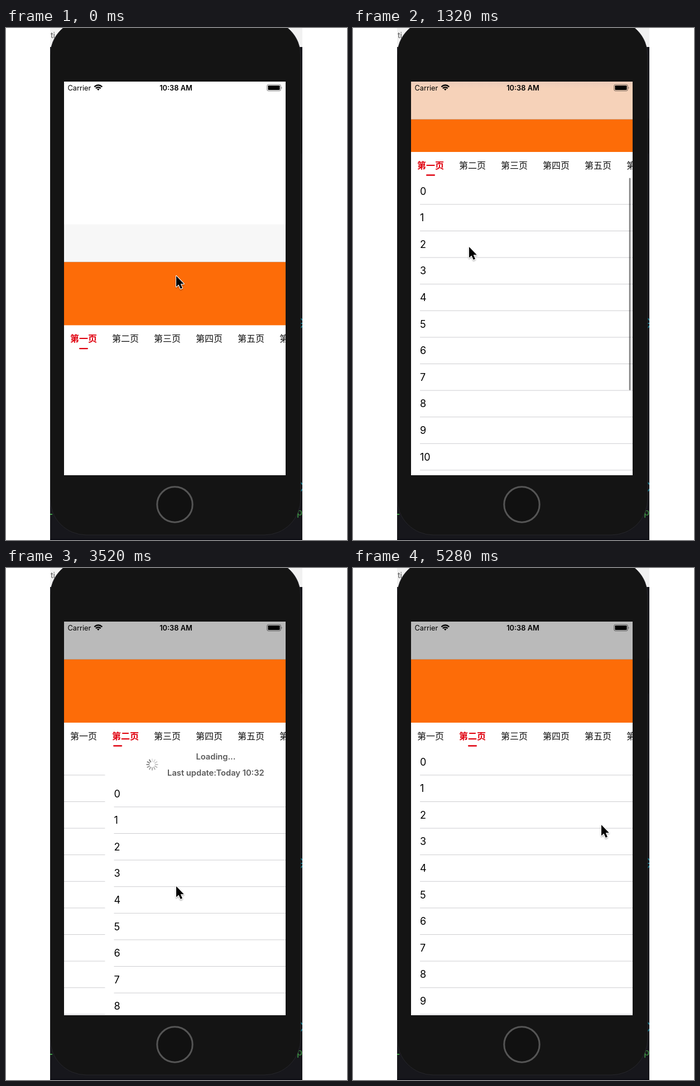
These frames come from a looping animation (611x917 px, 5500 ms). An HTML page:

```html
<!DOCTYPE html>
<html lang="zh-CN">
<head>
<meta charset="utf-8">
<title>Paged list demo</title>
<style>
  html, body { margin: 0; width: 100%; height: 100%; overflow: hidden; background: #fff; }
  svg { display: block; width: 100vw; height: 100vh; font-family: Inter, Roboto, sans-serif; }
  .tab { font: 16px "Noto Sans CJK SC", "Noto Sans CJK", sans-serif; text-anchor: middle; fill: #111; }
  .tab.on { font-weight: 700; fill: #e0000f; }
  .row { font-size: 18px; fill: #000; }
  .note { font-size: 14.7px; font-weight: 600; fill: #5a5a5a; text-anchor: middle; }
  .code { font: 17px "Noto Sans Mono", monospace; }
</style>
</head>
<body>
<svg viewBox="0 0 611 917">
  <defs>
    <clipPath id="stage"><rect x="79" width="452" height="917"/></clipPath>
    <clipPath id="screen"><rect x="104" y="96" width="397" height="705"/></clipPath>
    <clipPath id="list"><rect id="listBox" x="104" width="397" height="800"/></clipPath>
    <linearGradient id="blur" gradientUnits="userSpaceOnUse" x1="0" x2="0">
      <stop offset="0" stop-color="#bababa"/>
      <stop offset=".5" stop-color="#e9cabb"/>
      <stop offset="1" stop-color="#f6d2b9"/>
    </linearGradient>
    <filter id="shade" x="-50%" y="-50%" width="200%" height="200%">
      <feDropShadow dx="0" dy="1.5" stdDeviation="1.2" flood-opacity=".35"/>
    </filter>
  </defs>

  <g clip-path="url(#stage)">
    <rect x="79" width="452" height="917" fill="#17171c"/>
    <rect x="79" width="452" height="34" fill="#f1f1f1"/>
    <text x="80" y="18" font-size="14" fill="#555">ti</text>
    <path d="M528 520l4 4m-4 5h4m-4 8l4-4M528 814l4 4m-4 12l4-5" stroke="#167f91" stroke-width="2"/>
    <text class="code" x="521" y="873" fill="#3f9b45">p</text>
    <path d="M79 871h4" stroke="#3f9b45" stroke-width="2"/>
    <rect x="79" y="915" width="452" height="2" fill="#0b0b12"/>
    <rect x="526" y="162" width="4" height="63" rx="1" fill="#101010"/>
    <rect x="79" y="-15" width="449" height="923" rx="65" fill="#141414" stroke="#26262a"/>
    <circle cx="302.5" cy="853.5" r="31.7" fill="#111" stroke="#555" stroke-width="3"/>
  </g>

  <g clip-path="url(#screen)">
    <rect x="104" y="96" width="397" height="705" fill="#fff"/>
    <g id="view">
      <g clip-path="url(#list)" id="pages"></g>
      <rect id="head" x="104" y="163.5" width="397" fill="#fd6c08"/>
      <rect id="nav" x="104" y="96" width="397" height="67.5"/>
      <path d="M104 163.5h397" stroke="#000" stroke-opacity=".22" stroke-width=".8"/>
      <g id="tabs">
        <rect x="104" width="397" height="46.3" fill="#fff"/>
        <rect id="mark" y="40.3" width="16" height="2.4" rx="1.2" fill="#e0000f"/>
      </g>
    </g>
    <text x="110.5" y="111.7" font-size="12.8">Carrier</text>
    <g fill="none" stroke="#000" stroke-width="2.3">
      <path d="M158.3 105.3q7-6 14 0M160.9 108q4.4-3.7 8.8 0"/>
      <path d="M163 109.5q2.3-1.8 4.6 0L165.300 112z" fill="#000" stroke="none"/>
    </g>
    <text x="304.5" y="111.7" font-size="12.8" font-weight="600" text-anchor="middle">10:38 AM</text>
    <rect x="467.700" y="101.300" width="24.600" height="11.400" rx="2.600" fill="none" stroke="#000" stroke-opacity=".5"/>
    <rect x="469.400" y="103" width="21.200" height="8" rx="1.200"/>
    <path d="M493.500 105.200q2.200 1.800 0 3.700z" fill-opacity=".55"/>
  </g>

  <path id="mouse" d="M0 0V19.500L4.400 15.500L7.800 23L11 21.600L7.700 14.300H13.800Z"
        stroke="#fff" stroke-width="2" paint-order="stroke" stroke-linejoin="round" filter="url(#shade)"/>
</svg>

<script>
const STEP = 220, COUNT = 25;
const LEFT = 104, WIDTH = 397, NAV_END = 163.5, HEAD = 113.5, TAB = 46.3, ROW = 47.6;

// step, view offset, header scroll, page, pull, mouse x, mouse y
const KEYS = [
  [0, 255.6, 0, 0, 0, 305, 444],
  [1, 12, 0, 0, 0, 300, 485],
  [2, 0, 0, 0, 0, 270, 546],
  [3, 0, 35.5, 0, 0, 265, 516],
  [4, 0, 50, 0, 0, 254, 484],
  [6, 0, 55, 0, 0, 208, 392],
  [8, 0, 63.5, 0, 0, 310, 362],
  [9, 0, 63.5, .3, 0, 270, 350],
  [10, 0, 63.5, .86, 0, 220, 342],
  [11, 0, 63.5, 1, 0, 240, 335],
  [13, 0, 63.5, 1, 0, 303, 322],
  [14, 0, 22, 1, 0, 304, 400],
  [15, 0, 0, 1, 84, 305, 540],
  [16, 0, 0, .815, 57, 305, 570],
  [17, 0, 0, .96, 57, 350, 560],
  [18, 0, 0, 1, 57, 410, 545],
  [21, 0, 0, 1, 82.5, 443, 640],
  [22, 0, 0, 1, 57, 444, 580],
  [23, 0, 0, 1, 0, 445, 520],
  [24, 0, 0, 1, 0, 445, 460]
];

const $ = id => document.getElementById(id);
const set = (el, attrs) => { for (const k in attrs) el.setAttribute(k, attrs[k]); };
const move = (el, x, y) => el.setAttribute("transform", `translate(${x} ${y})`);

function add(parent, tag, attrs, text = "") {
  const el = document.createElementNS("http://www.w3.org/2000/svg", tag);
  set(el, attrs);
  el.textContent = text;
  return parent.appendChild(el);
}

const tabs = [..."一二三四五六"].map((n, i) =>
  add($("tabs"), "text", { class: "tab", x: 139 + 75 * i, y: 29.700 }, `第${n}页`));

function makePage() {
  const page = add($("pages"), "g", {});
  for (let i = 0; i < 13; i++) {
    add(page, "text", { class: "row", x: 16, y: i * ROW + 30.300 }, i);
    add(page, "path", { d: `M16 ${(i + 1) * ROW}H${WIDTH}`, stroke: "#c9c9cc", "stroke-width": .9 });
  }
  return page;
}

const pages = [makePage(), makePage()];
add(pages[1], "text", { class: "note", x: 198.500, y: -37 }, "Loading...");
add(pages[1], "text", { class: "note", x: 198.500, y: -8.300 }, "Last update:Today 10:32");
const spokes = Array.from({ length: 12 }, (_, i) => add(pages[1], "path", {
  d: "M0-5.600V-9.800", stroke: "#555", "stroke-width": 1.900, "stroke-linecap": "round",
  transform: `translate(84.500 -28.300) rotate(${i * 30})`
}));
const bar = add($("pages"), "rect", { x: 494.700, width: 2.700, rx: 1.350, fill: "#000", "fill-opacity": .48 });

function pose(step) {
  const i = KEYS.findLastIndex(k => k[0] <= step);
  const a = KEYS[i], b = KEYS[i + 1] || a;
  const f = a === b ? 0 : (step - a[0]) / (b[0] - a[0]);
  return a.slice(1).map((v, j) => v + (b[j + 1] - v) * f);
}

function draw(step) {
  const [offset, scroll, page, pull, mx, my] = pose(step);
  const top = NAV_END + HEAD - scroll, listTop = top + TAB;

  move($("view"), 0, offset);
  move($("tabs"), 0, top);
  set($("head"), { height: HEAD - scroll });
  set($("nav"), { fill: step < 2 ? "#f7f7f7" : scroll ? "url(#blur)" : "#bababa" });
  set($("blur"), { y1: NAV_END - scroll - 34, y2: NAV_END - scroll });
  set($("listBox"), { y: listTop });
  set($("mark"), { x: 131 + 75 * page });
  tabs.forEach((t, i) => t.classList.toggle("on", i === Math.round(page)));

  pages.forEach((p, i) => {
    move(p, LEFT + (i - page) * WIDTH, listTop + i * pull);
    p.style.display = step < 5 ? "none" : "";
  });
  spokes.forEach((s, i) => set(s, { opacity: .18 + .6 * ((i - step * 3 + 96) % 12) / 11 }));

  const dragging = step >= 5 && step <= 8 || step === 14 || step === 15 || step >= 19 && step <= 22;
  set(bar, {
    y: listTop,
    height: step < 14 ? 380.500 : 325.500 - pull,
    visibility: dragging ? "visible" : "hidden"
  });
  move($("mouse"), mx, my);
}

const start = performance.now();
function tick() {
  draw(Math.floor((performance.now() - start) / STEP) % COUNT);
  requestAnimationFrame(tick);
}
tick();
</script>
</body>
</html>
```
